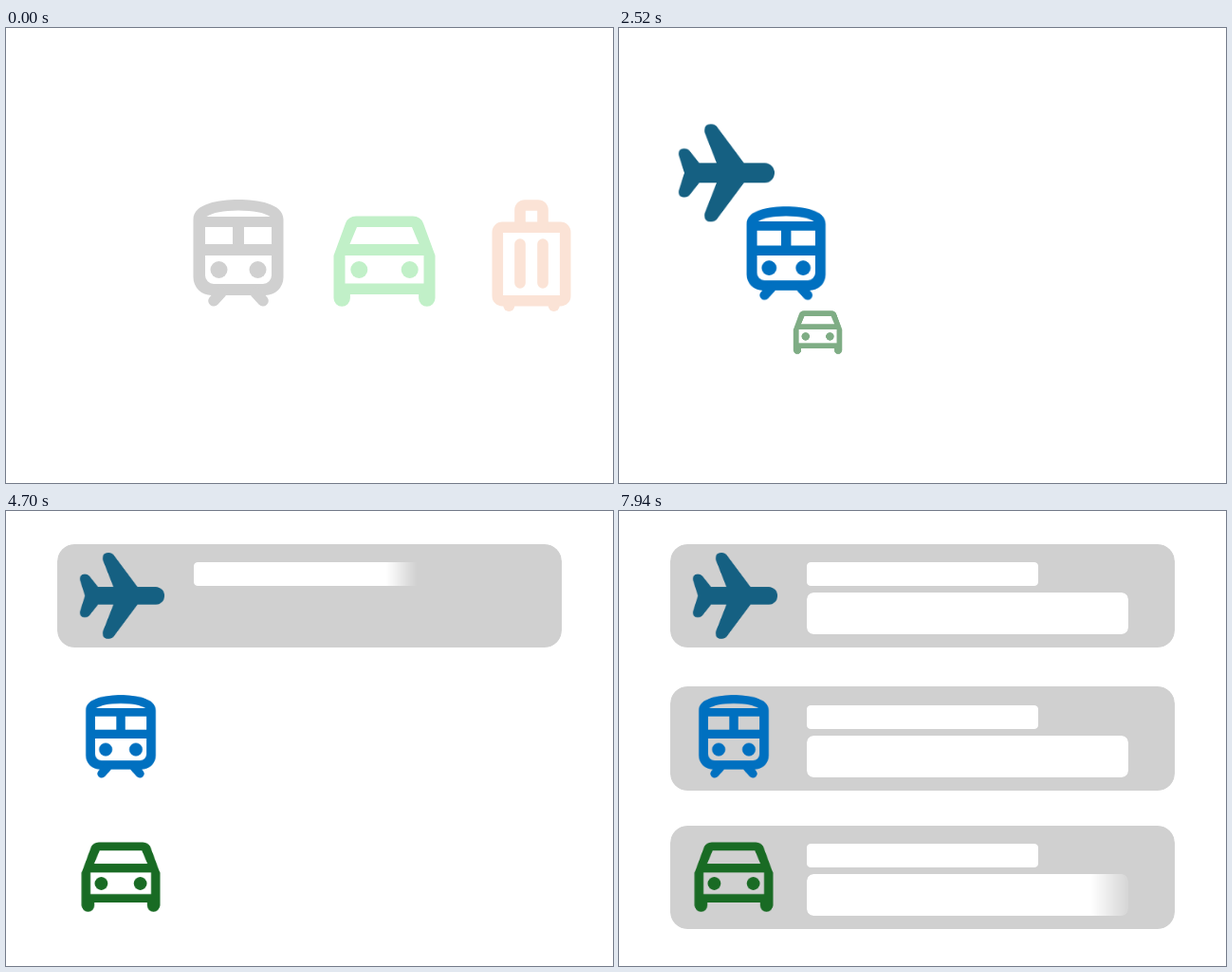
Animation of 640 by 480 pixels, one loop 8000 ms. Source, as an HTML page without scripts:

```html
<!DOCTYPE html>
<html lang="en">
<head>
<meta charset="utf-8">
<title>Travel icons</title>
<style>
html, body { margin: 0; width: 100%; height: 100%; overflow: hidden; background: #fff; }
.stage { position: relative; width: 640px; height: 480px; overflow: hidden; }
svg { position: absolute; inset: 0; }

/* Cards: every box is wiped in from the left with a soft edge */
.card, .line, .block {
  position: absolute;
  -webkit-mask: linear-gradient(90deg, #000 44.13%, transparent 50%) 89.5% 0 / 226.6% 100% no-repeat;
  animation: 8s linear infinite;
}
.card { left: 54px; width: 532px; height: 109px; border-radius: 18px; background: #d0d0d0; }
.line { left: 198px; width: 244px; height: 25px; border-radius: 4px; background: #fff; }
.block { left: 198px; width: 339px; height: 44px; border-radius: 7px; background: #fff; }

@keyframes wipe1 { 0%, 48.28% { -webkit-mask-position: 89.5% 0 } 53.84%, to { -webkit-mask-position: 0 0 } }
@keyframes wipe2 { 0%, 54.03% { -webkit-mask-position: 89.5% 0 } 59.59%, to { -webkit-mask-position: 0 0 } }
@keyframes wipe3 { 0%, 59.78% { -webkit-mask-position: 89.5% 0 } 65.34%, to { -webkit-mask-position: 0 0 } }
@keyframes wipe4 { 0%, 65.53% { -webkit-mask-position: 89.5% 0 } 71.09%, to { -webkit-mask-position: 0 0 } }
@keyframes wipe5 { 0%, 71.28% { -webkit-mask-position: 89.5% 0 } 76.84%, to { -webkit-mask-position: 0 0 } }
@keyframes wipe6 { 0%, 77.03% { -webkit-mask-position: 89.5% 0 } 82.59%, to { -webkit-mask-position: 0 0 } }
@keyframes wipe7 { 0%, 82.78% { -webkit-mask-position: 89.5% 0 } 88.34%, to { -webkit-mask-position: 0 0 } }
@keyframes wipe8 { 0%, 88.53% { -webkit-mask-position: 89.5% 0 } 94.09%, to { -webkit-mask-position: 0 0 } }
@keyframes wipe9 { 0%, 94.28% { -webkit-mask-position: 89.5% 0 } 99.84%, to { -webkit-mask-position: 0 0 } }

/* Icons: light up one after another, then travel to the left column */
.icon { fill: currentColor; fill-rule: evenodd; animation: 8s linear infinite; }
.plane { color: #156082; animation-name: fade, plane; }
.train { animation-name: blue, train; }
.car { transform: translate(399px, 246px); animation-name: green, leave; }
.case { transform: translate(554px, 240px); animation-name: orange, leave; }
.parked { color: #196b24; animation-name: park; }
.stroke { fill: none; stroke: currentColor; stroke-width: 11.6; }

@keyframes fade { 0% { opacity: 0 } 5.94%, to { opacity: 1 } }
@keyframes blue { 0%, 5.94% { color: #d0d0d0 } 11.88%, to { color: #0070c0 } }
@keyframes green { 0%, 11.88% { color: #c1f0c8 } 17.81%, to { color: #196b24 } }
@keyframes orange { 0%, 17.81% { color: #fbe3d6 } 23.75%, to { color: #e97132 } }
@keyframes leave { 0%, 24.4% { opacity: 1 } 30.5%, to { opacity: 0 } }
@keyframes plane {
  0%, 24.4% { transform: translate(102px, 232px) scale(1); animation-timing-function: ease }
  46.5%, to { transform: translate(122.5px, 89.4px) scale(.77) }
}
@keyframes train {
  0%, 24.4% { transform: translate(245px, 237px) scale(1); animation-timing-function: ease }
  46.5%, to { transform: translate(121px, 237.6px) scale(.777) }
}
@keyframes park {
  0%, 24.4% { transform: translate(320px, 240px) scale(.12); opacity: 0; animation-timing-function: ease }
  46.5%, to { transform: translate(121px, 386px) scale(.77); opacity: 1 }
}
</style>
</head>
<body>
<div class="stage">
  <div class="card" style="top:35px;animation-name:wipe1"></div>
  <div class="line" style="top:54px;animation-name:wipe2"></div>
  <div class="block" style="top:86px;animation-name:wipe3"></div>

  <div class="card" style="top:185px;height:110px;animation-name:wipe4"></div>
  <div class="line" style="top:205px;animation-name:wipe5"></div>
  <div class="block" style="top:237px;animation-name:wipe6"></div>

  <div class="card" style="top:332px;animation-name:wipe7"></div>
  <div class="line" style="top:351px;animation-name:wipe8"></div>
  <div class="block" style="top:383px;animation-name:wipe9"></div>

  <svg width="640" height="480" viewBox="0 0 640 480">
    <defs>
      <g id="car">
        <path d="M-53.5-6L-41-40Q-38-47.5-30-47.5H30Q38-47.5 41-40L53.5-6V39a8.7 8.7 0 0 1-17.4 0V35H-36.1V39a8.7 8.7 0 0 1-17.4 0Z
          M-29-36H29L36.5-18H-36.5Z M-41.5-6H41.5V23.5H-41.5Z"/>
        <circle cx="-26.7" cy="9" r="9"/>
        <circle cx="26.7" cy="9" r="9"/>
      </g>
    </defs>

    <g class="icon case">
      <rect class="stroke" x="-35.7" y="-29.7" width="71.4" height="77.4" rx="5"/>
      <path class="stroke" d="M-12-28V-48a5 5 0 0 1 5-5H7a5 5 0 0 1 5 5V-28"/>
      <path class="stroke" stroke-linecap="round" d="M-12-12V29M12-12V29"/>
      <circle cx="-23.7" cy="53" r="6"/>
      <circle cx="23.7" cy="53" r="6"/>
    </g>

    <g class="icon car"><use href="#car"/></g>
    <g class="icon parked"><use href="#car"/></g>

    <g class="icon train">
      <path d="M-47.5-35C-47.5-52-20-56 0-56S47.5-52 47.5-35V26A19 19 0 0 1 28.5 45H-28.5A19 19 0 0 1-47.5 26Z
        M-33.5-38Q-24-44.5 0-44.5T33.5-38Z M-35-27h29v18h-29Z M6-27h29v18h-29Z
        M-35 3H35V24a9 9 0 0 1-9 9H-26a9 9 0 0 1-9-9Z"/>
      <circle cx="-20.5" cy="18" r="9"/>
      <circle cx="20.5" cy="18" r="9"/>
      <path class="stroke" stroke-linecap="round" d="M-18 42L-26 50.8M18 42L26 50.8"/>
    </g>

    <g class="icon plane">
      <path d="M-51 0L-57.6-21Q-59-29-52-29.5Q-47-30-44.5-26.5L-33-12H-12L-26.5-49Q-28-59-19-59Q-13.5-59-11-55L21-12H46
        A12 12 0 0 1 46 12H21L-11 55Q-13.5 59-19 59Q-28 59-26.5 49L-12 12H-33L-44.5 26.5Q-47 30-52 29.5Q-59 29-57.6 21Z"/>
    </g>
  </svg>
</div>
</body>
</html>
```
